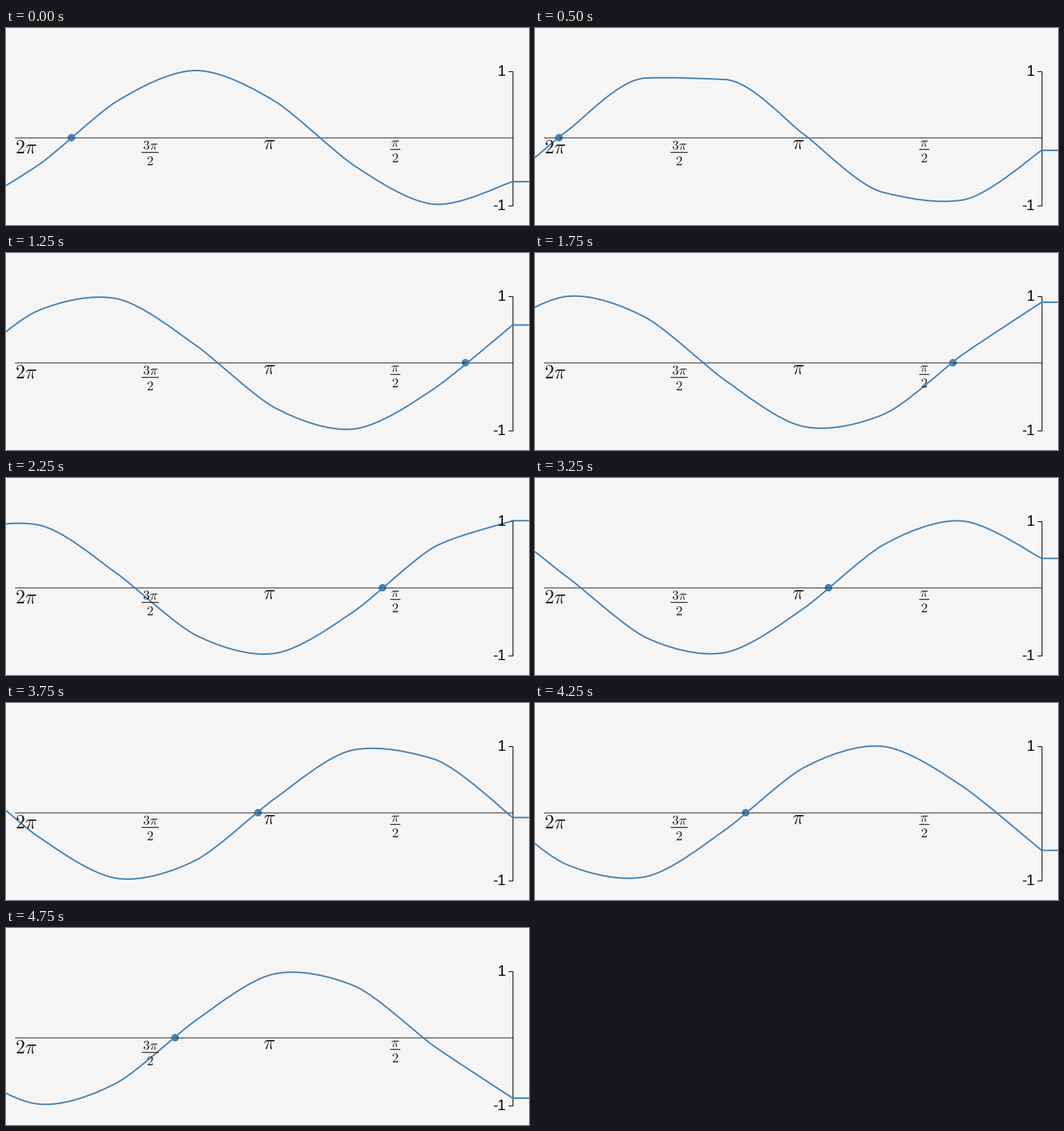
These frames come from a looping animation (702 px wide and 264 px high, 5000 ms). A matplotlib script:

```python
import math

import matplotlib.pyplot as plt
from matplotlib.animation import FuncAnimation
from matplotlib.patches import Circle, PathPatch
from matplotlib.path import Path

plt.rcParams["mathtext.fontset"] = "cm"

W, H, DPI = 702, 264, 72
FRAMES, INTERVAL = 20, 250
RIGHT, LEFT, MID, AMP = 680, 12, 147, 90
UNIT = (RIGHT - LEFT) / (2 * math.pi)   # pixels per radian
STEP = math.pi / 12                     # phase advance per frame
START = 21.275 * STEP
KNOTS = 11
BLUE, INK = "#4682b4", "#222222"

fig = plt.figure(figsize=(W / DPI, H / DPI), dpi=DPI, facecolor="#f5f5f5")
ax = fig.add_axes([0, 0, 1, 1])
ax.set_xlim(0, W)
ax.set_ylim(H, 0)
ax.axis("off")


def rule(xs, ys, color="black", width=1, snap=False, z=4):
    ax.plot(xs, ys, color=color, lw=width, solid_capstyle="butt",
            solid_joinstyle="miter", snap=snap, zorder=z)


def label(x, y, text, size, ha="center", color=INK, **kw):
    ax.text(x, y, text, fontsize=size, ha=ha, va="baseline",
            color=color, zorder=5, **kw)


def fraction(x, y, top, half):
    label(x, y - 4, top, 18.4)
    rule([x - half, x + half], [y, y], INK, 1.2, z=5)
    label(x, y + 17, "$2$", 18.4)


def tangents(pts):
    """Monotone cubic tangents, shortened where the slope is steep."""
    last = len(pts) - 1
    d = [(b[1] - a[1]) / (b[0] - a[0]) for a, b in zip(pts, pts[1:])]
    m = [d[0]] + [(a + b) / 2 for a, b in zip(d, d[1:])] + [d[-1]]
    for i, slope in enumerate(d):
        if abs(slope) < 1e-6:
            m[i] = m[i + 1] = 0
            continue
        a, b = m[i] / slope, m[i + 1] / slope
        s = a * a + b * b
        if s > 9:
            s = 3 * slope / math.sqrt(s)
            m[i], m[i + 1] = s * a, s * b
    out = []
    for i, k in enumerate(m):
        span = pts[min(last, i + 1)][0] - pts[max(0, i - 1)][0]
        s = span / (6 * (1 + k * k))
        out.append((s, k * s))
    return out


def wave(phase):
    pts = [(RIGHT - UNIT * k, MID - AMP * math.sin(phase - k))
           for k in range(KNOTS)]
    tan = tangents(pts)
    verts = [(W + 5, pts[0][1]), pts[0]]
    codes = [Path.MOVETO, Path.LINETO]
    for i in range(1, KNOTS):
        (x0, y0), (x1, y1) = pts[i - 1], pts[i]
        (u0, v0), (u1, v1) = tan[i - 1], tan[i]
        verts += [(x0 + u0, y0 + v0), (x1 - u1, y1 - v1), (x1, y1)]
        codes += [Path.CURVE4] * 3
    return Path(verts, codes)


# axes and labels
rule([LEFT, RIGHT], [MID + 0.25] * 2, color="#222222", z=3)
rule([673.5, 679.5, 679.5, 673.5], [57.5, 57.5, 237.5, 237.5], snap=True, z=3)
for y, text in ((57, "1"), (237, "-1")):
    label(670.5, y + 6.5, text, 20, ha="right", color="black",
          family="Liberation Sans")
label(11.7, 167.5, r"$2\pi$", 26, ha="left")
label(353.5, 161, r"$\pi$", 26)
fraction(193.5, 166.7, r"$3\pi$", 11.5)
fraction(522.5, 162.7, r"$\pi$", 6.8)

curve = PathPatch(wave(START), fc="none", ec=BLUE, lw=2, snap=False,
                  capstyle="butt", joinstyle="miter", zorder=4)
dot = Circle((0, MID), 5, fc=BLUE, ec="none", zorder=2)
ax.add_patch(curve)
ax.add_patch(dot)


def update(i):
    phase = START + i * STEP
    curve.set_path(wave(phase))
    dot.center = (RIGHT - UNIT * (phase % (2 * math.pi)), MID)
    return curve, dot


anim = FuncAnimation(fig, update, frames=FRAMES, interval=INTERVAL,
                     repeat=True, repeat_delay=0)
plt.show()
```
